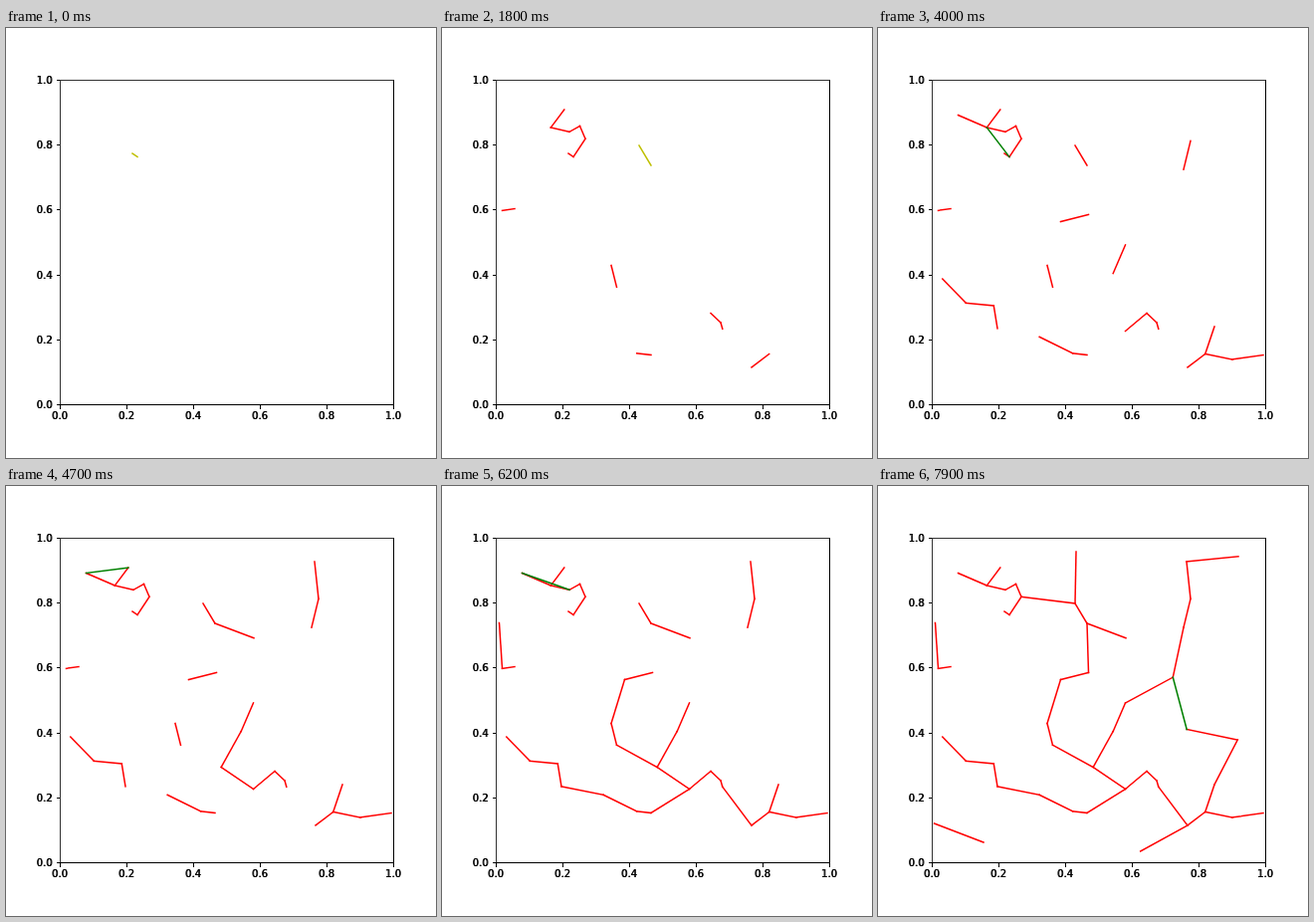
An HTML page that plays this animation: 432 by 432 pixels, repeating every 8 s.

```html
<!DOCTYPE html>
<html lang="en">
<head>
<meta charset="utf-8">
<title>Minimum spanning tree</title>
<style>
  html, body { margin: 0; width: 100%; height: 100%; overflow: hidden; background: #fff; }
  svg { display: block; width: 100vw; height: 100vh; }
  text { font: 10px "DejaVu Sans", sans-serif; }
</style>
</head>
<body>
<svg id="plot" viewBox="0 0 432 432">
  <rect width="432" height="432" fill="#fff"/>
  <g id="edges" fill="none" stroke-width="1.5" stroke-linecap="square"></g>
  <g id="axes" stroke="#000" fill="none" shape-rendering="crispEdges">
    <path d="M54.5 379V52.5H389" stroke="#333"/>
    <path d="M54 378.5H389.5V52"/>
  </g>
  <g id="labels"></g>
</svg>
<script>
const STEP = 100;
const STEPS = 80;
const ASPECT = 334.8 / 326.16; // plot width over plot height
const COLORS = { tree: '#ff0000', accepted: '#bfbf00', rejected: '#008000' };

// Nodes of the graph, in stage pixels.
const points = `127,126 132,129.5 144,111.3 138.5,98.5 128,104.3 109.3,100 122.8,82 80.5,87.5
198,118 210,138 249,152.8 211.5,187.5 183.5,194.5 170,238.5 175.5,260.3 216.2,282.5
236.2,246.5 248.5,218 248.5,304.5 270,286.5 280,296 281.8,302.2 311,341 328.7,327.5
338,300 356,333 387,328.5 361.3,255 310.2,244.5 296.3,192.2 307,142.2 314,113.3
310,76 362,70.8 199,66 57.5,137.5 60.5,183.3 73,181.5 64.8,252 88.3,276.3
116.3,279 120,302 162.2,310.3 195.7,326.8 210,328.5 56.5,339 106,358 263.7,367`
  .split(/\s+/).map(pair => pair.split(',').map(Number));

function add(parent, tag, attrs, text = '') {
  const node = document.createElementNS('http://www.w3.org/2000/svg', tag);
  for (const key in attrs) node.setAttribute(key, attrs[key]);
  node.textContent = text;
  return parent.appendChild(node);
}

const [edgeLayer, axes, labels] = ['edges', 'axes', 'labels'].map(id => document.getElementById(id));

for (let i = 0; i <= 5; i++) {
  const x = Math.round(54 + 66.96 * i) + 0.5;
  const y = Math.round(378 - 65.23 * i) + 0.5;
  const value = (i / 5).toFixed(1);
  add(axes, 'path', { d: `M${x} 379v3.5M54 ${y}h-3.5` });
  // Labels are plotted twice, slightly apart, which makes them look heavy.
  for (const shift of [-0.7, 0]) {
    add(labels, 'text', { x: x + shift, y: 393, 'text-anchor': 'middle' }, value);
    add(labels, 'text', { x: 47 + shift, y: y + 3.2, 'text-anchor': 'end' }, value);
  }
}

// All pairs of nodes, shortest first.
const pairs = points.flatMap((p, a) => points.slice(0, a).map((q, b) => ({
  a, b, length: Math.hypot(p[0] - q[0], (p[1] - q[1]) * ASPECT)
}))).sort((e, f) => e.length - f.length);

// Kruskal: an edge joins the tree unless its ends are already connected.
const parent = points.map((_, i) => i);
const root = i => parent[i] === i ? i : root(parent[i]);
const edges = pairs.slice(0, STEPS).map(({ a, b }) => {
  const from = root(a), to = root(b);
  parent[from] = to;
  return { accepted: from !== to, node: add(edgeLayer, 'path', { d: `M${points[a]}L${points[b]}` }) };
});

function draw(time) {
  const current = Math.floor(time / STEP) % STEPS;
  edges.forEach(({ accepted, node }, i) => {
    const visible = i === current || (i < current && accepted);
    const state = i < current ? 'tree' : accepted ? 'accepted' : 'rejected';
    node.setAttribute('visibility', visible ? 'visible' : 'hidden');
    node.setAttribute('stroke', COLORS[state]);
  });
}

const start = performance.now();
function tick() {
  draw(performance.now() - start);
  requestAnimationFrame(tick);
}
tick();
</script>
</body>
</html>
```
